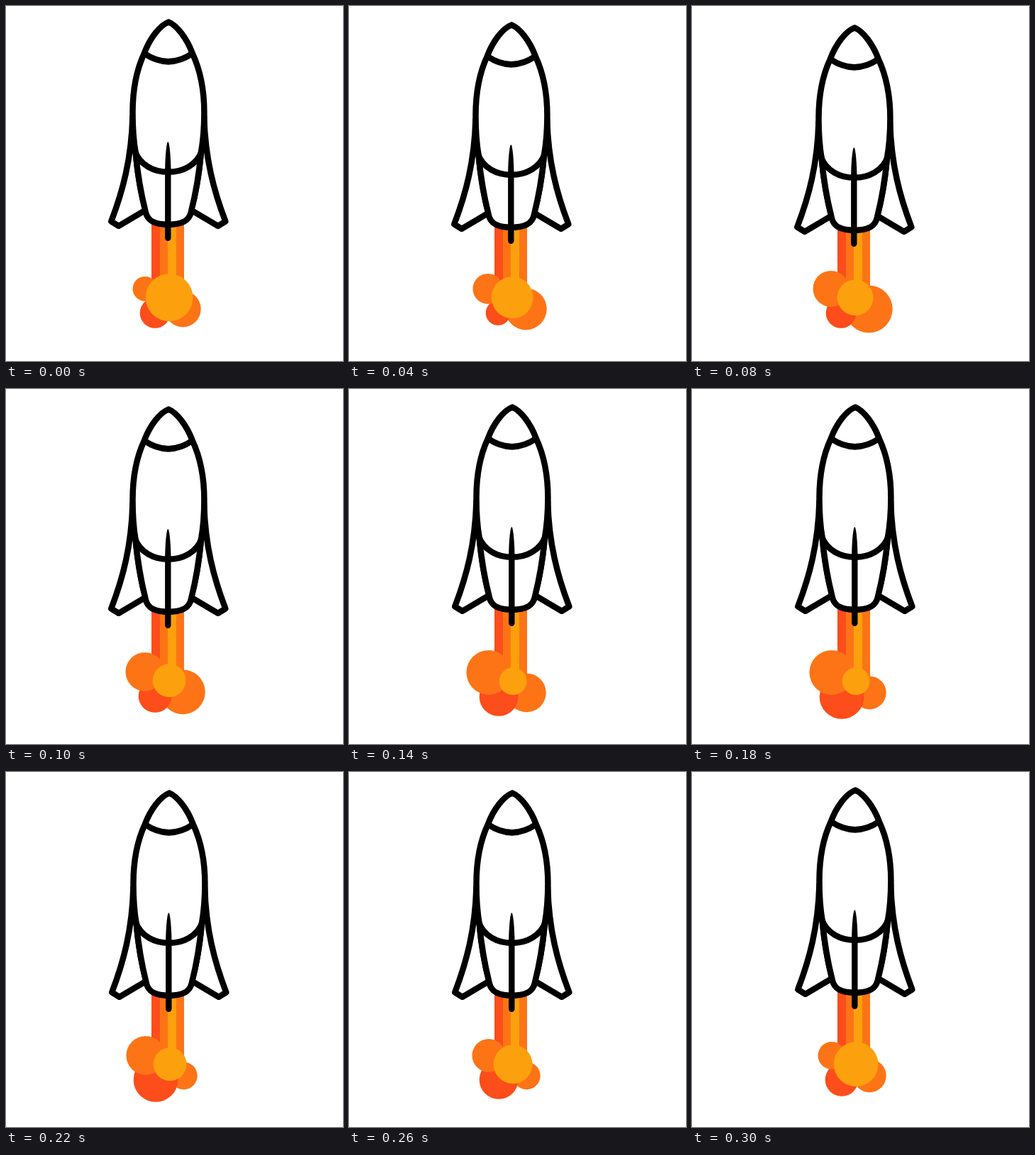
Write an HTML page with a canvas that moves like this. It is 475 px wide and 500 px high and loops after 320 ms.

```html
<!DOCTYPE html>
<html lang="en">
<head>
<meta charset="utf-8">
<title>Rocket</title>
<style>
  html, body { margin: 0; width: 100%; height: 100%; overflow: hidden; background: #fff; }
  canvas { display: block; }
</style>
</head>
<body>
<canvas id="stage" width="475" height="500"></canvas>
<script>
const ctx = document.getElementById('stage').getContext('2d');
const LOOP = 320, STEP = 20, AXIS = 228.8;
const RED = '#fc4d1b', ORANGE = '#fd7416', YELLOW = '#fca00d';

// Triangle wave: 0 at the start of a period, 1 in its middle.
const triangle = (t, period) => {
  const p = (((t % period) + period) % period) / period;
  return 1 - Math.abs(2 * p - 1);
};

// Paths relative to the rocket's axis.
const body = new Path2D(`M0.4 22.3 C-12 27 -26 45 -34 66.5 C-45 90 -50.3 120 -50.3 150
  C-50.3 175 -49 190 -46 207 C-43 240 -37 270 -32 290 C-29 303.5 -17 307.6 0 307.6
  C17 307.6 29 303.5 32 290 C37 270 43 240 46 207 C49 190 50.6 175 50.6 150
  C50.6 120 45 90 34 66.5 C26 45 12 27 0.4 22.3 Z`);
const bands = new Path2D(`M-34 66.5 Q0 89.5 34 66.5
  M-47 204 C-40 224 -20 233.5 0 233.5 C20 233.5 40 224 47 204`);
const fin = new Path2D(`M-50.3 155 C-52 215 -64 260 -80.5 303 L-70 309.5 L-32 287
  C-37 270 -43 240 -46 207 Z`);
const spike = new Path2D(`M-0.5 191 C-2.5 191 -4.7 212 -4.7 236 L-4.7 326.5
  A4.2 4.2 0 0 0 3.7 326.5 L3.7 236 C3.7 212 1.5 191 -0.5 191 Z`);

// Puffs from back to front; each is smallest at its own time.
const puffs = [
  { x: 249.3, y: 426.8, color: ORANGE, smallest: 240 },
  { x: 210.1, y: 432.4, color: RED, smallest: 40 },
  { x: 195.9, y: 398.3, color: ORANGE, smallest: 0 },
  { x: 230.1, y: 410.6, color: YELLOW, smallest: 160 }
];

function outline(path) {
  ctx.fill(path);
  ctx.stroke(path);
}

function drawFlame(t, shift) {
  [RED, ORANGE, YELLOW, ORANGE].forEach((color, i) => {
    const left = Math.round(205 + i * 11.5);
    ctx.fillStyle = color;
    ctx.fillRect(left, 290, 251 - left, 120);
  });
  for (const { x, y, color, smallest } of puffs) {
    ctx.fillStyle = color;
    ctx.beginPath();
    ctx.arc(x + shift, y + shift, 17.4 + 16 * triangle(t - smallest, LOOP), 0, 2 * Math.PI);
    ctx.fill();
  }
}

function drawRocket(t, shift) {
  ctx.save();
  ctx.translate(AXIS + shift, 0.3 + 8 * triangle(t, LOOP / 2) + shift);
  ctx.fillStyle = '#fff';
  ctx.strokeStyle = '#000';
  ctx.lineWidth = 8.5;
  ctx.lineJoin = 'round';
  outline(fin);
  ctx.save();
  ctx.scale(-1, 1);
  outline(fin);
  ctx.restore();
  outline(body);
  ctx.stroke(bands);
  ctx.fillStyle = '#000';
  ctx.fill(spike);
  ctx.restore();
}

function draw(now) {
  const t = Math.floor((now % LOOP) / STEP) * STEP;
  const shift = t >= 120 ? 1 : 0;
  ctx.fillStyle = '#fff';
  ctx.fillRect(0, 0, 475, 500);
  drawFlame(t, shift);
  drawRocket(t, shift);
}

let start;
function tick(now) {
  start ??= now;
  draw(now - start);
  requestAnimationFrame(tick);
}
draw(0);
requestAnimationFrame(tick);
</script>
</body>
</html>
```
